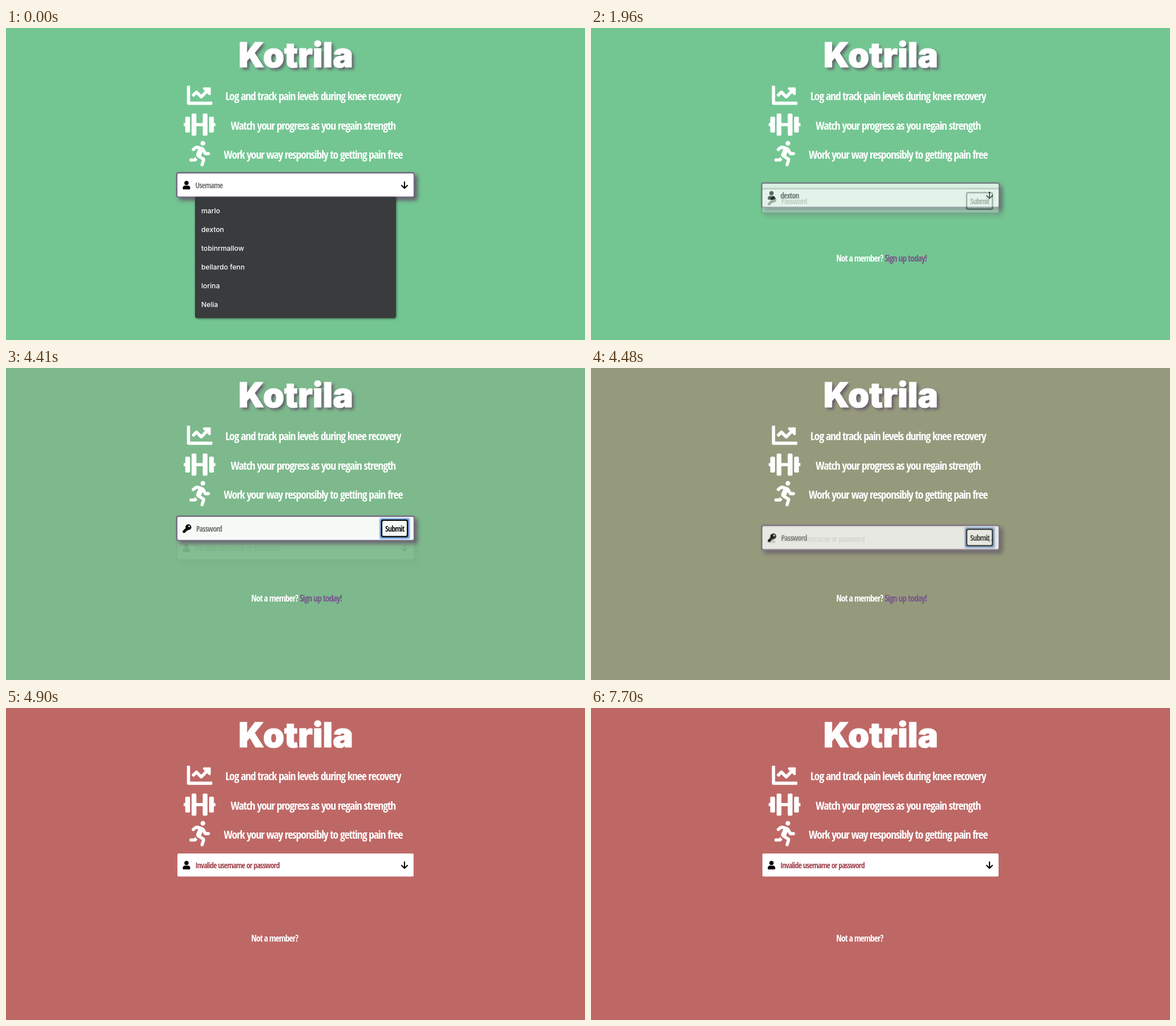
An HTML page with a canvas that plays this animation: 1020 px wide and 549 px high, repeating every 7770 ms.

```html
<!DOCTYPE html>
<html lang="en">
<head>
<meta charset="utf-8">
<title>Kotrila</title>
<style>
  html, body { margin: 0; width: 100%; height: 100%; overflow: hidden; background: #73c692; }
  canvas { display: block; width: 100vw; height: 100vh; }
</style>
</head>
<body>
<canvas id="stage" width="1020" height="549"></canvas>
<script>
const W = 1020, H = 549, LOOP = 7770, STEP = 70;
const SLIDE = 46, SLIDE_MS = 450;
const TO_PASSWORD = 1852, TO_ERROR = 4354, FLAT = 4830;
const GREEN = [115, 198, 146], RED = [190, 104, 102];
const PURPLE = '#776a83', SHADOW = 'rgba(98,86,104,0.9)';
const USERS = ['marlo', 'dexton', 'tobinrmallow', 'bellardo fenn', 'lorina', 'Nelia'];
const FEATURES = [
  ['Log and track pain levels during knee recovery', 120],
  ['Watch your progress as you regain strength', 171.5],
  ['Work your way responsibly to getting pain free', 223]
];

const stage = document.getElementById('stage').getContext('2d');
const layerCanvas = document.createElement('canvas');
layerCanvas.width = W;
layerCanvas.height = H;
const layer = layerCanvas.getContext('2d');

// Icons on a 512 unit grid
const chart = new Path2D('M496 384H64V80c0-8.8-7.2-16-16-16H16C7.2 64 0 71.2 0 80v336c0 17.7 14.3 32 32 32h464c8.8 0 16-7.2 16-16v-32c0-8.8-7.2-16-16-16zM464 96H346c-21.4 0-32.1 25.9-17 41l32.4 32.4L288 242.8l-73.4-73.4c-12.5-12.5-32.8-12.5-45.3 0l-68.6 68.7c-6.3 6.2-6.3 16.3 0 22.6l22.6 22.6c6.2 6.3 16.4 6.3 22.6 0L192 237.3l73.4 73.3c12.5 12.5 32.8 12.5 45.2 0l96-96 32.4 32.4c15.1 15.1 41 4.4 41-17V112c0-8.8-7.2-16-16-16z');
const runner = new Path2D('M272 96a48 48 0 1 0 0-96a48 48 0 1 0 0 96zM113.7 317.5L98.9 352H32a32 32 0 0 0 0 64h77.5c19.2 0 36.5-11.4 44.1-29.1l8.8-20.5-10.7-6.3c-17.3-10.2-30.1-25.4-38-42.6zM384 224h-44l-26.1-53.3c-12.5-25.5-35.4-44.2-61.8-50.9l-71-21.1c-28.3-6.8-57.8-.6-80.9 17.1l-39.7 30.4a32 32 0 0 0 39 50.8l39.7-30.4c7.6-5.9 17.4-8 25.2-6.2l14.7 4.4-37.4 87.4c-12.7 29.5-1.3 64 26.3 80.3l85 50.2-27.5 87.7a32 32 0 0 0 61 19.1l31.7-101.1c5.9-20.8-2.9-43.1-21.7-54.5l-61.2-36.1 31.3-78.3 20.3 41.4c8 16.3 24.9 26.9 43.1 26.9h54a32 32 0 0 0 0-64z');
const key = new Path2D('M512 176C512 273 433 352 336 352c-11 0-22-1-33-3l-24 27a24 24 0 0 1-18 8H224v40a24 24 0 0 1-24 24h-40v40a24 24 0 0 1-24 24H24a24 24 0 0 1-24-24v-78q0-10 7-17l162-162C163 214 160 195 160 176C160 79 239 0 336 0S512 79 512 176zM336 128a48 48 0 1 0 96 0a48 48 0 1 0-96 0z');
const person = new Path2D('M224 0a128 128 0 1 1 0 256a128 128 0 1 1 0-256zM314 288h-17q-73 33-146 0h-17C60 288 0 348 0 422v42a48 48 0 0 0 48 48h352a48 48 0 0 0 48-48v-42c0-74-60-134-134-134z');
const dumbbell = new Path2D();
for (const [x, y, w, h, r] of [
  [0, 224, 60, 64, 8], [32, 96, 96, 320, 24], [160, 32, 96, 448, 24], [250, 224, 140, 64, 0],
  [384, 32, 96, 448, 24], [512, 96, 96, 320, 24], [580, 224, 60, 64, 8]
]) dumbbell.roundRect(x, y, w, h, r);

// Take the face that is narrowest for its height, sized from the longest feature line
const TRACKING = -0.055;
const condensed = (family, size, weight) =>
  `${weight} extra-condensed ${size}px "${family}", sans-serif`;
function measure(family, str) {
  stage.font = condensed(family, 100, 700);
  stage.letterSpacing = 100 * TRACKING + 'px';
  const metrics = stage.measureText(str);
  stage.letterSpacing = '0px';
  return metrics;
}
const narrowness = family =>
  measure(family, FEATURES[0][0]).width / measure(family, 'x').actualBoundingBoxAscent;
const face = [
  'Noto Sans ExtraCondensed', 'Open Sans Condensed', 'Roboto Condensed', 'Liberation Sans Narrow',
  'Noto Sans CJK JP', 'Noto Sans', 'Open Sans', 'Roboto', 'Lato'
].sort((a, b) => narrowness(a) - narrowness(b))[0];
const EM = 100 * 309 / measure(face, FEATURES[0][0]).width;

const clamp = v => Math.min(1, Math.max(0, v));

function ease(x) {
  x = clamp(x);
  if (x === 0 || x === 1) return x;
  const bez = (a, b, s) => 3 * a * s * (1 - s) ** 2 + 3 * b * s * s * (1 - s) + s ** 3;
  let lo = 0, hi = 1;
  for (let i = 0; i < 24; i++) {
    const mid = (lo + hi) / 2;
    if (bez(0.25, 0.25, mid) < x) lo = mid; else hi = mid;
  }
  return bez(0.1, 1, lo);
}

function label(c, str, x, y, scale, color, weight = 700, align = 'left') {
  const size = EM * scale;
  c.font = condensed(face, size, weight);
  c.letterSpacing = size * TRACKING + 'px';
  c.textAlign = align;
  c.textBaseline = 'alphabetic';
  c.fillStyle = color;
  // Centre the capital height on y
  c.fillText(str, x, y + c.measureText('H').actualBoundingBoxAscent / 2);
  const width = c.measureText(str).width;
  c.letterSpacing = '0px';
  return width;
}

function icon(c, path, x, y, scale, color) {
  c.save();
  c.translate(x, y);
  c.scale(scale, scale);
  c.fillStyle = color;
  c.fill(path, path === key ? 'evenodd' : 'nonzero');
  c.restore();
}

function box(c, x, y, w, h, r, color) {
  c.fillStyle = color;
  c.beginPath();
  c.roundRect(x, y, w, h, r);
  c.fill();
}

function shadow(c, color, offset, blur) {
  c.shadowColor = color;
  c.shadowOffsetX = c.shadowOffsetY = offset;
  c.shadowBlur = blur;
}

function title(flat) {
  stage.save();
  stage.font = '900 60px Inter, sans-serif';
  stage.textAlign = 'center';
  stage.textBaseline = 'alphabetic';
  stage.fillStyle = stage.strokeStyle = '#fff';
  stage.lineWidth = 1.2;
  stage.lineJoin = 'round';
  if (!flat) shadow(stage, SHADOW, 4, 5);
  stage.fillText('Kotrila', 510.5, 68.5);
  shadow(stage, 'transparent', 0, 0);
  stage.strokeText('Kotrila', 510.5, 68.5);
  stage.restore();
}

function page(tint, flat) {
  const bg = GREEN.map((g, i) => Math.round(g + (RED[i] - g) * tint));
  stage.fillStyle = `rgb(${bg})`;
  stage.fillRect(0, 0, W, H);
  title(flat);
  icon(stage, chart, 318.7, 96, 0.0875, '#fff');
  icon(stage, dumbbell, 313, 147.6, 0.0875, '#fff');
  icon(stage, runner, 323, 198.7, 0.0875, '#fff');
  for (const [str, y] of FEATURES) label(stage, str, 541, y, 1, '#fff', 700, 'center');
  const w = label(stage, 'Not a member? ', 432, 405, 0.78, '#fff');
  if (!flat) label(stage, 'Sign up today!', 432 + w, 405, 0.78, '#77578a');
}

function frame(flat) {
  if (!flat) {
    layer.save();
    shadow(layer, SHADOW, 5, 7);
    box(layer, 299.5, 253.5, 420.5, 45, 4, PURPLE);
    layer.restore();
  }
  box(layer, 302, 256, 416, 40.5, 2, '#fff');
}

function caret(x) {
  layer.fillStyle = '#222';
  layer.fillRect(x, 268, 1, 17);
}

function usernameField(t, flat) {
  frame(flat);
  icon(layer, person, 311.4, 268.9, 0.0293, '#000');
  const typed = t < 560 ? 0 : t < 630 ? 2 : t < 700 ? 4 : t < 840 ? 5 : 6;
  if (t >= TO_ERROR) {
    label(layer, 'Invalide username or password', 333.5, 277, 0.7, flat ? '#a3434d' : '#757575', 500);
  } else if (!typed) {
    label(layer, 'Username', 333.5, 277, 0.7, '#757575', 500);
  } else {
    const w = label(layer, USERS[1].slice(0, typed), 333.5, 277, 0.7, '#222', 500);
    if (t < 1260) caret(334 + w);
  }
  layer.strokeStyle = '#000';
  layer.lineWidth = 2.1;
  layer.lineCap = layer.lineJoin = 'round';
  layer.beginPath();
  layer.moveTo(702, 271);
  layer.lineTo(702, 281.5);
  layer.moveTo(697, 277);
  layer.lineTo(702, 282);
  layer.lineTo(707, 277);
  layer.stroke();
}

function dotCount(t) {
  const times = [2800, 2870, 2870, 2940, 3080, 3080, 3150, 3360, 3430];
  return t < TO_ERROR ? times.filter(at => t >= at).length : 0;
}

function passwordField(t, flat) {
  frame(flat);
  icon(layer, key, 311.4, 268.9, 0.0295, '#000');
  const dots = dotCount(t);
  if (dots) {
    for (let i = 0; i < dots; i++) box(layer, 336 + i * 3.1, 276, 2.2, 2.2, 1.1, '#111');
    if (t < 3640) caret(336 + dots * 3.1);
  } else {
    label(layer, 'Password', 335, 277, 0.7, '#757575', 500);
  }
  if (t >= 3640) {
    box(layer, 657.5, 257.5, 54.5, 38, 4, '#a9c8f5');
    box(layer, 659, 259, 51.5, 35, 4, '#7ba6ea');
  }
  box(layer, 660.5, 260.5, 48, 31.5, 4, '#08080c');
  box(layer, 663, 263, 43, 26.5, 2, '#fff');
  label(layer, 'Submit', 684.7, 277, 0.7, '#111', 500, 'center');
}

// Draw a field as one group, lowered and faded
function slide(draw, t, flat, offset, alpha) {
  if (alpha <= 0) return;
  layer.clearRect(0, 0, W, H);
  draw(t, flat);
  stage.globalAlpha = alpha;
  stage.drawImage(layerCanvas, 0, Math.round(offset));
  stage.globalAlpha = 1;
}

function dropdown(t) {
  const alpha = 1 - clamp((t - 70) / 210);
  if (!alpha) return;
  layer.clearRect(0, 0, W, H);
  layer.save();
  shadow(layer, 'rgba(0,0,0,0.45)', 1, 4);
  box(layer, 333, 297.5, 354, 213, [1, 1, 4, 4], '#393b3d');
  layer.restore();
  layer.font = '500 12.2px Inter, sans-serif';
  layer.textAlign = 'left';
  layer.textBaseline = 'middle';
  layer.fillStyle = '#fff';
  USERS.forEach((name, i) => layer.fillText(name, 344, 322 + i * 33));
  stage.globalAlpha = alpha;
  stage.drawImage(layerCanvas, 0, 0);
  stage.globalAlpha = 1;
}

function render(time) {
  const t = Math.floor((time % LOOP) / STEP) * STEP;
  const tint = ease((t - TO_ERROR) / SLIDE_MS);
  const flat = t >= FLAT;
  const back = t >= TO_ERROR;
  const p = back ? tint : ease((t - TO_PASSWORD) / SLIDE_MS);
  const fadeIn = p ** 1.4;
  const arriving = [SLIDE * (1 - p), fadeIn], leaving = [SLIDE * p, 1 - fadeIn];

  page(tint, flat);
  slide(usernameField, t, flat, ...(back ? arriving : leaving));
  slide(passwordField, t, flat, ...(back ? leaving : arriving));
  dropdown(t);
}

const start = performance.now();
function tick() {
  render(performance.now() - start);
  requestAnimationFrame(tick);
}
tick();
</script>
</body>
</html>
```
